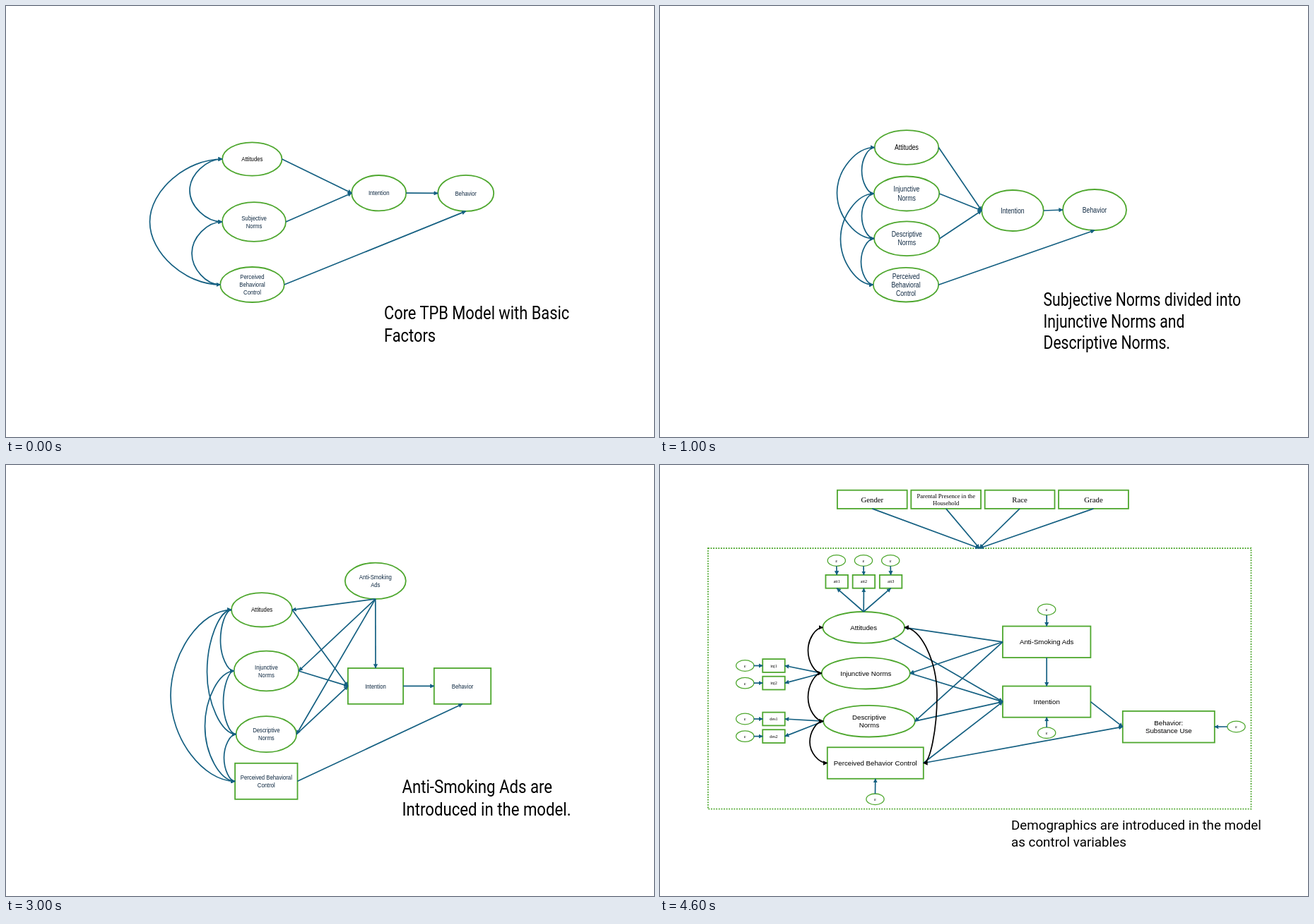
An HTML page for the animation above (5 s loop, 917 by 611 pixels).

```html
<!DOCTYPE html>
<html lang="en">
<head>
<meta charset="utf-8">
<title>Model build-up</title>
<style>
  html, body { margin: 0; width: 100%; height: 100%; overflow: hidden; background: #fff; }
  svg { display: block; width: 100vw; height: 100vh; }
  .node { fill: none; stroke: #4ea72e; stroke-width: 1.8; }
  .thin { stroke-width: 1.3; }
  .link { fill: none; stroke: #156082; stroke-width: 1.7; }
  .dark { stroke: #000; }
  .frame { stroke-dasharray: 1.8 1.8; }
  .label { font-family: "Liberation Sans", Arial, sans-serif; text-anchor: middle; }
  .serif { font-family: "Liberation Serif", "Times New Roman", serif; }
  .caption { font-family: Roboto, "Open Sans", sans-serif; }
</style>
</head>
<body>
<svg viewBox="0 0 917 611">
  <defs>
    <marker id="head" viewBox="0 0 6 6" refX="5.5" refY="3" markerWidth="6.2" markerHeight="6.2"
            markerUnits="userSpaceOnUse" orient="auto-start-reverse">
      <path d="M0 0L6 3L0 6Z" fill="#156082"/>
    </marker>
    <marker id="darkHead" viewBox="0 0 6 6" refX="5.5" refY="3" markerWidth="6.4" markerHeight="6.4"
            markerUnits="userSpaceOnUse" orient="auto-start-reverse">
      <path d="M0 0L6 3L0 6Z"/>
    </marker>
  </defs>
</svg>
<script>
const svg = document.querySelector('svg');
const NAVY = '#0e2841';
const SCENE_MS = 1000;
let group, style;

function add(tag, attrs, parent = group) {
  const el = document.createElementNS('http://www.w3.org/2000/svg', tag);
  for (const key in attrs) el.setAttribute(key, attrs[key]);
  return parent.appendChild(el);
}

// Each scene is a picture with its own text size and horizontal squeeze.
function text(str, x, y, size, gap, cls, fill) {
  str.split('\n').forEach((line, i) => {
    add('text', {
      class: cls, fill, 'font-size': size,
      transform: `translate(${x} ${y + i * gap}) scale(${style.squeeze} 1)`
    }).textContent = line;
  });
}

function label(str, x, y, size, cls) {
  const gap = size * 1.19;
  const top = y - (str.split('\n').length - 1) / 2 * gap + size * 0.35;
  text(str, x, top, size, gap, cls, str === 'Attitudes' ? '#000' : style.ink);
}

const anchors = (x, y, rx, ry) => ({ l: [x - rx, y], r: [x + rx, y], t: [x, y - ry], b: [x, y + ry] });

function oval(str, x, y, rx, ry, size = style.size, cls = '') {
  add('ellipse', { class: 'node ' + cls, cx: x, cy: y, rx, ry });
  label(str, x, y, size, 'label ' + cls);
  return anchors(x, y, rx, ry);
}

function box(str, x, y, w, h, size = style.size, cls = '') {
  add('rect', { class: 'node', x: x - w / 2, y: y - h / 2, width: w, height: h });
  label(str, x, y, size, 'label ' + cls);
  return anchors(x, y, w / 2, h / 2);
}

function link(from, to) {
  add('path', { class: 'link', d: `M${from}L${to}`, 'marker-end': 'url(#head)' });
}

// Double-headed connector that swings out to x = far.
function bend([x1, y1], [x2, y2], far, dark) {
  const h = y2 - y1, head = `url(#${dark ? 'darkHead' : 'head'})`;
  add('path', {
    class: dark ? 'link dark' : 'link',
    d: `M${x1} ${y1}C${(x1 + far) / 2} ${y1} ${far} ${y1 + h / 4} ${far} ${y1 + h / 2}` +
       `S${(x2 + far) / 2} ${y2} ${x2} ${y2}`,
    'marker-start': head, 'marker-end': head
  });
}

function caption(str, x, y, size, gap) {
  text(str, x, y, size, gap, 'caption', '#000');
}

function paths(causes, control, intention, behavior) {
  causes.forEach(cause => link(cause.r, intention.l));
  link(intention.r, behavior.l);
  link(control.r, behavior.b);
}

function coreModel() {
  const att = oval('Attitudes', 348.3, 217, 42.2, 23.6);
  const norms = oval('Subjective\nNorms', 351, 306, 45, 27.8);
  const control = oval('Perceived\nBehavioral\nControl', 348.5, 395, 45.3, 25);
  const intention = oval('Intention', 527.7, 265.2, 38.5, 25.2);
  const behavior = oval('Behavior', 650.7, 265.4, 39.5, 25.5);
  paths([att, norms], control, intention, behavior);
  bend(att.l, norms.l, 260);
  bend(att.l, control.l, 203.5);
  bend(norms.l, control.l, 263);
  caption('Core TPB Model with Basic\nFactors', 535, 443.5, 26, 32);
}

function splitNorms() {
  const att = oval('Attitudes', 349, 200.5, 45.3, 24.3);
  const inj = oval('Injunctive\nNorms', 349, 266, 46.2, 24.5);
  const des = oval('Descriptive\nNorms', 349.3, 329.7, 46.3, 24.4);
  const control = oval('Perceived\nBehavioral\nControl', 348, 395.2, 46.2, 24.3);
  const intention = oval('Intention', 499, 290, 43.8, 29);
  const behavior = oval('Behavior', 615, 289, 45, 29);
  paths([att, inj, des], control, intention, behavior);
  bend(att.l, inj.l, 285.5);
  bend(att.l, des.l, 250.5);
  bend(inj.l, des.l, 285.5);
  bend(inj.l, control.l, 255.5);
  bend(des.l, control.l, 284.5);
  caption('Subjective Norms divided into\nInjunctive Norms and\nDescriptive Norms.', 542.5, 425, 25, 30.6);
}

function observedFactors() {
  const att = oval('Attitudes', 352.5, 198.7, 49, 26.5);
  const inj = oval('Injunctive\nNorms', 352.8, 269.7, 50, 26.5);
  const des = oval('Descriptive\nNorms', 353, 338.7, 50, 26.5);
  const control = box('Perceived\nBehavioral Control', 351.6, 409.5, 100, 53);
  const intention = box('Intention', 515.2, 295.4, 95.2, 62.4);
  const behavior = box('Behavior', 640.7, 294.8, 97.4, 62.4);
  paths([att, inj, des], control, intention, behavior);
  bend(att.l, inj.l, 284);
  bend(att.l, des.l, 246);
  bend(inj.l, des.l, 283.5);
  bend(inj.l, control.l, 251.5);
  bend(des.l, control.l, 283);
  caption('Latent Factors and Observed\nFactors are distinguished', 591, 469.5, 22, 27);
}

function adsModel() {
  const ads = oval('Anti-Smoking\nAds', 522.8, 164.3, 43, 25.6);
  const att = oval('Attitudes', 362, 205.3, 43, 24.2);
  const inj = oval('Injunctive\nNorms', 368.4, 292, 45.8, 28.4);
  const des = oval('Descriptive\nNorms', 368.3, 381.7, 42.8, 25.5);
  const control = box('Perceived Behavioral\nControl', 368.3, 448.3, 88.4, 51);
  const intention = box('Intention', 523, 313.4, 78.2, 50.8);
  const behavior = box('Behavior', 646, 313.4, 80.4, 50.8);
  [att.r, inj.r, des.r, intention.t].forEach(end => link(ads.b, end));
  paths([att, inj, des], control, intention, behavior);
  bend(att.l, inj.l, 303.5);
  bend(att.l, des.l, 284.5);
  bend(att.l, control.l, 233);
  bend(inj.l, des.l, 307.5);
  bend(inj.l, control.l, 281.5);
  bend(des.l, control.l, 308.5);
  caption('Anti-Smoking Ads are\nIntroduced in the model.', 560.5, 465, 26, 32);
}

function fullModel() {
  const error = (x, y) => oval('ε', x, y, 12.6, 7.8, 7, 'serif thin');
  const item = (str, x, y) => box(str, x, y, 31.5, 18.8, 6.2, 'serif');

  add('rect', { class: 'node frame', x: 68, y: 118, width: 768.5, height: 369.7 });
  ['Gender', 'Parental Presence in the\nHousehold', 'Race', 'Grade'].forEach((str, i) => {
    const top = box(str, 300.3 + i * 104.4, 48.8, 98.8, 26.2, i === 1 ? 8.65 : 10.8, 'serif');
    link(top.b, [452, 118]);
  });

  const att = oval('Attitudes', 288.2, 230.3, 57.8, 22.3);
  const inj = oval('Injunctive Norms', 291.3, 295.2, 62.5, 22.3);
  const des = oval('Descriptive\nNorms', 296, 363.2, 64.8, 22.3);
  const control = box('Perceived Behavior Control', 304.8, 422.5, 136, 44.5);
  const ads = box('Anti-Smoking Ads', 547.2, 250.8, 124.4, 44.5);
  const intention = box('Intention', 547.2, 335.6, 124.4, 44.2);
  const behavior = box('Behavior:\nSubstance Use', 719.8, 371.2, 130, 44.6);

  for (let i = 0; i < 3; i++) {
    const x = 249.8 + i * 38.2, indicator = item('att' + (i + 1), x + 0.4, 165.3);
    link(error(x, 135.5).b, indicator.t);
    link(att.t, indicator.b);
  }
  [[inj, 'inj', 284.5], [des, 'des', 360]].forEach(([factor, name, y0]) => {
    for (let i = 0; i < 2; i++) {
      const y = y0 + i * 24.6, indicator = item(name + (i + 1), 161, y);
      link(error(120.3, y).r, indicator.l);
      link(factor.l, indicator.r);
    }
  });
  link(error(304.5, 473.8).t, control.b);
  link(error(547.2, 205).b, ads.t);
  link(error(547.2, 379.7).t, intention.b);
  link(error(815.5, 371).l, behavior.r);

  [att, inj, des].forEach(factor => link(ads.l, factor.r));
  link(ads.b, intention.t);
  [[330, 245.6], inj.r, des.r, control.r].forEach(start => link(start, intention.l));
  link(intention.r, behavior.l);
  link(control.r, behavior.l);

  bend(att.l, inj.l, 209.5, true);
  bend(inj.l, des.l, 209.5, true);
  bend(des.l, control.l, 212, true);
  bend(att.r, control.r, 392, true);
  caption('Demographics are introduced in the model\nas control variables', 497, 517, 18.8, 24);
}

const scenes = [
  [coreModel, { size: 9.2, squeeze: 0.84, ink: NAVY }],
  [splitNorms, { size: 10.3, squeeze: 0.847, ink: NAVY }],
  [observedFactors, { size: 11.1, squeeze: 0.855, ink: NAVY }],
  [adsModel, { size: 9.1, squeeze: 0.853, ink: NAVY }],
  [fullModel, { size: 9.7, squeeze: 1, ink: '#000' }]
].map(([draw, look]) => {
  group = add('g', {}, svg);
  style = look;
  draw();
  return group;
});

const start = performance.now();
function tick() {
  const current = Math.floor((performance.now() - start) / SCENE_MS) % scenes.length;
  scenes.forEach((scene, i) => { scene.style.display = i === current ? '' : 'none'; });
  requestAnimationFrame(tick);
}
tick();
</script>
</body>
</html>
```
